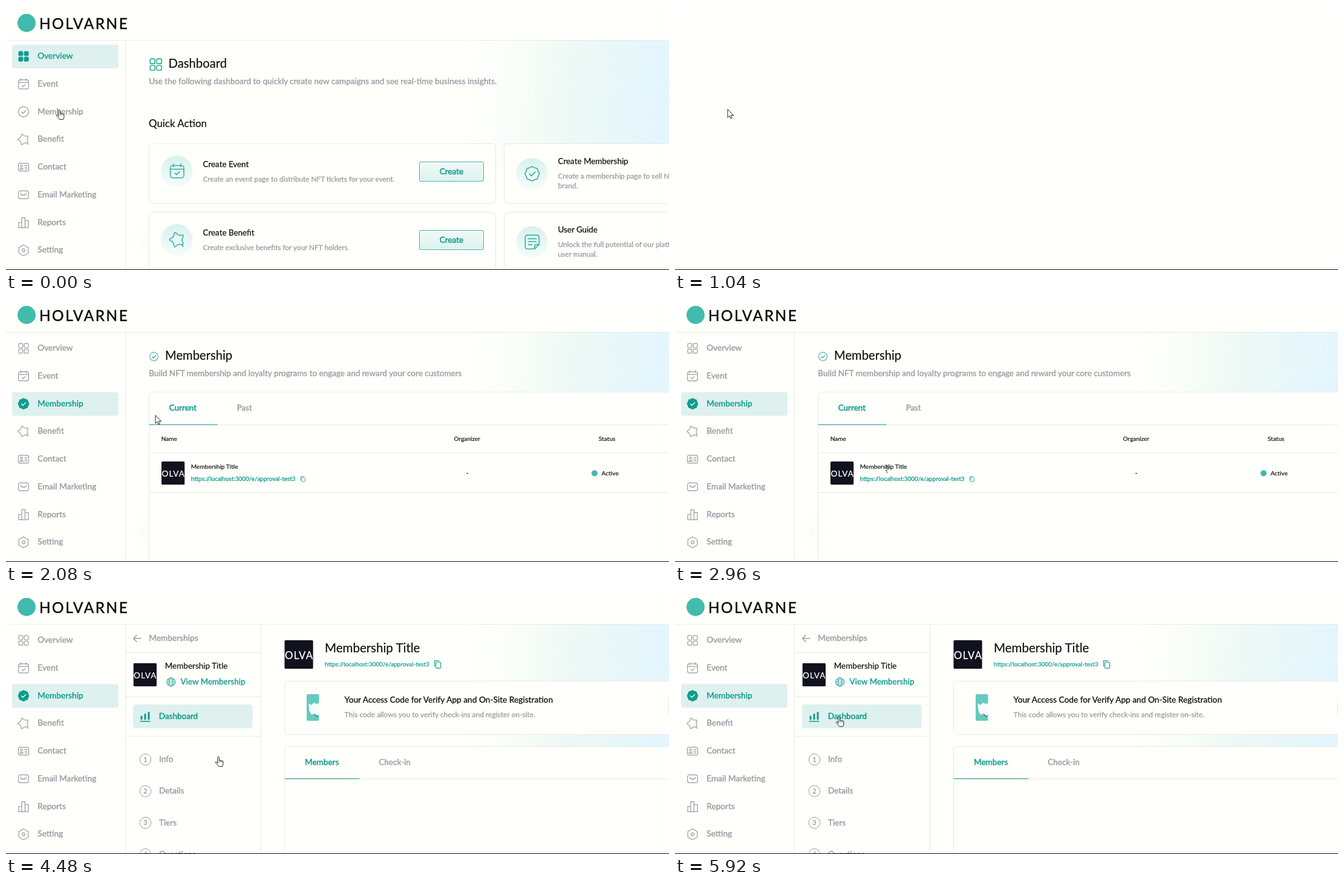
These frames come from a looping animation (1096 px wide and 436 px high, 6.08 s). An HTML page:

```html
<!DOCTYPE html>
<html lang="en">
<head>
<meta charset="utf-8">
<title>Dashboard walkthrough</title>
<style>
  html, body { margin: 0; width: 100%; height: 100%; overflow: hidden; background: #fffffc; }
  svg { display: block; width: 100%; height: 100%; font-family: Lato, "Open Sans", sans-serif; }
</style>
</head>
<body>
<svg id="stage" viewBox="0 0 1096 436"></svg>
<script>
const BG = '#fffffc', TEAL = '#109c8b', MINT = '#def1ef', GRAY = '#9b9ba2', INK = '#111', LINE = '#e8e8e8';
const BRAND = 'HOLVARNE';

// ---- drawing helpers ----
const text = (x, y, size, str, fill = INK, weight = 0.2, extra = '') =>
  `<text x="${x}" y="${y}" font-size="${size}" fill="${fill}" stroke="${fill}" stroke-width="${weight}" ${extra}>${str}</text>`;
const rect = (x, y, w, h, r, fill = BG, stroke = 'none', extra = '') =>
  `<rect x="${x}" y="${y}" width="${w}" height="${h}" rx="${r}" fill="${fill}" stroke="${stroke}" ${extra}/>`;
const path = (d, stroke, width = 1, fill = 'none') =>
  `<path d="${d}" fill="${fill}" stroke="${stroke}" stroke-width="${width}" stroke-linejoin="round" stroke-linecap="round"/>`;
const disc = (x, y, r, fill, stroke = 'none', width = 1) =>
  `<circle cx="${x}" cy="${y}" r="${r}" fill="${fill}" stroke="${stroke}" stroke-width="${width}"/>`;
const line = (d, color = LINE) => path(d, color);
const group = (body, attrs = '') => `<g ${attrs}>${body}</g>`;

// closed outline alternating between two radii, with rounded corners
function burst(n, outer, inner, turn = 0) {
  const corner = i => {
    const a = turn + i * Math.PI / n, r = i % 2 ? inner : outer;
    return [r * Math.sin(a), -r * Math.cos(a)];
  };
  const toward = (p, q) => p.map((v, k) => v + (q[k] - v) * 0.35);
  const str = p => p.map(v => v.toFixed(2)).join(' ');
  let d = '';
  for (let i = 0; i < n * 2; i++) {
    const p = corner(i);
    d += (i ? 'L' : 'M') + str(toward(p, corner(i + 2 * n - 1))) + 'Q' + str(p) + ' ' + str(toward(p, corner(i + 1)));
  }
  return d + 'Z';
}

// ---- icons, centred on 0,0 ----
const icons = {
  grid: (c, on) => [[-8, -8], [1.2, -8], [-8, 1.2], [1.2, 1.2]]
    .map(([x, y]) => rect(x, y, 6.8, 6.8, 1.6, on ? c : 'none', c, 'stroke-width="1.2"')).join(''),
  event: c => rect(-8.3, -7, 16.6, 15, 3, 'none', c, 'stroke-width="1.2"') +
    path('M-8-2.6H8M-4.5-9V-5.6M4.5-9V-5.6M-2.6 2.3L-.6 4.2 3 .7', c, 1.2),
  badge: (c, on) => path(burst(8, 9.2, 7.8), c, 1.2, on ? c : 'none') +
    path('M-3.4.3L-1 2.7 3.6-2', on ? '#fff' : c, 1.3),
  star: c => path(burst(5, 10.2, 5.6, -0.3), c, 1.2) + path('M5.4 6.2l2 2', c, 1.2),
  contact: c => rect(-8.5, -6.5, 17, 13, 2.5, 'none', c, 'stroke-width="1.2"') +
    disc(-3.3, -1.8, 1.8, 'none', c, 1.2) + path('M-6.3 3.5q3-3.4 6 0ZM2-2.5H6M2 .3H6M2 3H6', c, 1.2),
  mail: c => rect(-8.3, -6.5, 16.6, 13, 3, 'none', c, 'stroke-width="1.2"') + path('M-5-2.2Q0 3.6 5-2.2', c, 1.2),
  bars: c => path('M-8 8.4V0H-3V8.4M-3 8.4V-8H2.4V8.4M2.4 8.4V-3.4H8V8.4M-8.6 8.4H8.6', c, 1.2),
  setting: c => path('M0-9L7.8-4.5V4.5L0 9-7.8 4.5V-4.5Z', c, 1.2) + disc(0, 0, 2.5, 'none', c, 1.2),
  note: c => path('M-5.5-8.5H5.5Q8.5-8.5 8.5-5.5V3L3 8.5H-5.5Q-8.5 8.5-8.5 5.5V-5.5Q-8.5-8.5-5.5-8.5Z' +
    'M8.5 3H5.5Q3 3 3 5.5V8.5M-4.8-4H4.8M-4.8-.4H4.8M-4.8 3.2H0', c, 1.2),
  copy: c => rect(-2.2, -2.6, 5.6, 6.8, 1, BG, c, 'stroke-width=".8"') + path('M-3.6 2V-4.2H1.6', c, .8),
  globe: c => disc(0, 0, 7, 'none', c) + `<ellipse rx="3.2" ry="7" fill="none" stroke="${c}"/>` +
    path('M-7 0H7M-6-3.4H6M-6 3.4H6', c, .8)
};
const icon = (name, x, y, color, on = false, scale = 1) =>
  group(icons[name](color, on), `transform="translate(${x} ${y}) scale(${scale})"`);

function thumb(x, y, size) {
  return `<svg x="${x}" y="${y}" width="${size}" height="${size}" viewBox="0 0 38 38">` +
    rect(0, 0, 38, 38, 2, '#12121f') +
    text(19.5, 24.8, 13.4, BRAND.slice(1, 5), '#fff', .2, 'text-anchor="middle" letter-spacing="1"') + '</svg>';
}

// ---- shared parts ----
const menu = [['Overview', 'grid'], ['Event', 'event'], ['Membership', 'badge'], ['Benefit', 'star'],
  ['Contact', 'contact'], ['Email Marketing', 'mail'], ['Reports', 'bars'], ['Setting', 'setting']];

function frame(active) {
  const items = menu.map(([label, name], i) => {
    const y = 83.2 + 45.75 * i, on = i === active, c = on ? TEAL : GRAY;
    return (on ? rect(10, y - 19.3, 176, 39.2, 4, MINT) : '') +
      icon(name, 29, y, c, on) + text(52.3, y + 3.8, 13.7, label, c, .4);
  }).join('');
  return disc(34, 28, 15, '#41bbac') +
    text(55, 37.5, 24.4, BRAND, '#0c0c0c', .5, 'letter-spacing="2.5"') + items;
}

let streaks = '';
for (let i = 0; i < 9; i++) {
  const x = 905 + i * 27, y = 66 + (i * 37) % 60;
  streaks += `M${x} ${y + 34}l32-34`;
}
const glow = rect(740, 57, 356, 210, 0, 'url(#glow)') +
  `<path d="${streaks}" stroke="#fff" stroke-width="6" opacity=".13"/>` +
  rect(198, 340, 60, 95, 0, 'url(#haze)');
const edges = line('M0 56.5H1096M197.5 57V435');
const backdrop = glow + edges;

// ---- pages ----
function card(x, y, w, name, cy, title, lines, button) {
  const tx = x + 89, top = cy - (button ? 7 : 16);
  return rect(x, y, w, 99, 6, BG, LINE) + disc(x + 46, cy, 26, 'url(#puff)') +
    icon(name, x + 46.3, cy, '#35b3a3', false, 1.35) + text(tx, top, 13.4, title, INK, .25) +
    lines.map((s, i) => text(tx, top + 24.3 + 16 * i, 11.8, s, GRAY, .3)).join('') +
    (button ? rect(x + 447, cy - 15.5, 106, 32, 2.5, 'url(#btn)', '#4bb5a8') +
      text(x + 500, cy + 5, 13.6, 'Create', TEAL, .5, 'text-anchor="middle"') : '');
}

const overview = backdrop + frame(0) +
  icon('grid', 247.7, 96.7, TEAL, false, 1.18) + text(268.5, 102, 20.3, 'Dashboard') +
  text(236.3, 129.4, 13.5, 'Use the following dashboard to quickly create new campaigns and see real-time business insights.', GRAY, .35) +
  text(236, 200, 16.9, 'Quick Action') +
  card(236.5, 227.5, 573, 'event', 273, 'Create Event',
    ['Create an event page to distribute NFT tickets for your event.'], true) +
  card(823.5, 227.5, 573, 'badge', 277, 'Create Membership',
    ['Create a membership page to sell NFT memberships for your', 'brand.']) +
  card(236.5, 340.5, 573, 'star', 386, 'Create Benefit',
    ['Create exclusive benefits for your NFT holders.'], true) +
  card(823.5, 340.5, 573, 'note', 389.8, 'User Guide',
    ['Unlock the full potential of our platform with this', 'user manual.']);

const url = 'https://localhost:3000/e/approval-test3';

const list = group(rect(815, 60, 281, 95, 0, 'url(#block)'), 'id="rough"') +
  group(backdrop + rect(236.5, 155.5, 900, 300, 6, BG, LINE), 'id="late"') + frame(2) +
  icon('badge', 244.5, 96.7, TEAL, false, .83) + text(263, 102, 20.2, 'Membership') +
  text(236.3, 129.4, 13.5, 'Build NFT membership and loyalty programs to engage and reward your core customers', GRAY, .35) +
  text(269.7, 186.3, 13.5, 'Current', TEAL, .5) + text(381.8, 186.3, 13.2, 'Past', GRAY, .4) +
  line('M237 209.5H1096M237 255.8H1096M237 321.5H1096') +
  path('M237 209.2H349', '#3aaa9c', 1.2) +
  text(256.7, 235.6, 10.1, 'Name') + text(740.6, 235.6, 10.1, 'Organizer') + text(979.8, 235.6, 10.2, 'Status') +
  thumb(257, 270, 38.5) + text(305.8, 282.2, 10.15, 'Membership Title') +
  text(305.8, 301.5, 9.95, url, TEAL, .3) + icon('copy', 491, 299, TEAL) +
  text(760.4, 292.5, 10.5, '-') + disc(973, 289.5, 5, '#3fbaab') + text(984.6, 293, 10.1, 'Active');

const steps = ['Info', 'Details', 'Tiers', 'Questions'].map((label, i) => {
  const y = 280 + 52.2 * i;
  return disc(230.5, y, 9.3, 'none', GRAY) +
    text(230.5, y + 3.7, 11, i + 1, GRAY, .3, 'text-anchor="middle"') + text(253, y + 4.2, 13.6, label, GRAY, .4);
}).join('');

const phone = rect(497, 172, 20.5, 44, 2.5, '#66cabe') +
  path('M500 187l5 3 4-4 4 2 5-1 1 17-5 4-4-4-5 2-3-5Z', 'none', 0, '#f7fcfb') +
  path('M511 206l4 3', '#33514e', 1.2);

const detail = backdrop + frame(2) + rect(198, 57, 223, 378, 0) +
  line('M421.5 57V435M198 103.5H421M198 176.5H421M198 241.5H421') +
  path('M223 80H211M216 74.6L210.7 80 216 85.4', GRAY, 1.4) + text(236.3, 84, 13.7, 'Memberships', GRAY, .4) +
  thumb(210.5, 120.7, 38.5) + text(262.8, 130.2, 13.5, 'Membership Title') +
  icon('globe', 272.7, 152, TEAL) + text(288.6, 156.2, 13.45, 'View Membership', TEAL, .35) +
  rect(210, 189, 197.5, 39.5, 4, MINT) +
  path('M224 213V209M230 213V205.5M236 213V202.5', TEAL, 3) + path('M222 217H238', TEAL, 1.4) +
  text(252.8, 213, 13.5, 'Dashboard', TEAL, .5) + steps +
  thumb(460.3, 82.8, 47.5) + text(527, 102.8, 20.5, 'Membership Title') +
  text(527, 125.5, 9.95, url, TEAL, .25) + icon('copy', 713.7, 123, TEAL, false, 1.45) +
  rect(460.5, 150.5, 700, 88, 5, BG, LINE) + phone +
  text(559.6, 186.2, 13.72, 'Your Access Code for Verify App and On-Site Registration', INK, .3) +
  text(559.6, 210.2, 12, 'This code allows you to verify check-ins and register on-site.', GRAY, .3) +
  line('M1095.5 178V206') +
  rect(460.5, 258.5, 700, 200, 5, BG, LINE) +
  text(494, 288.6, 13.6, 'Members', TEAL, .5) + text(616.3, 288.6, 13.5, 'Check-in', GRAY, .4) +
  line('M461 312H1096') + path('M461 311.7H584', '#3aaa9c', 1.2);

// ---- pointers, hot spot at 0,0 ----
const pointers = {
  arrow: path('M0 0V13.2L3 10.4 5 15 7.2 14 5.2 9.6H9.3Z', '#222', 1, '#fff'),
  hand: group(path('M4.5 11V1.8a1.3 1.3 0 0 1 2.6 0V7a1.2 1.2 0 0 1 2.3.3 1.2 1.2 0 0 1 2.2.5 1.1 1.1 0 0 1 2 .6V12q0 2-1.5 4.6H6.2Q4 13 1 10.3q-.4-1.4 1.2-1.5Q3.5 9.3 4.5 11Z', '#222', 1, '#fff') +
    path('M7.1 7V9.5M9.4 7.5V9.7M11.6 8V10', '#444', .8), 'transform="translate(-4.6 -.2)"'),
  faint: path('M.3 1V9.5M2.8 0V9M-2.2 9.5q2-.6 2.4 2.2 1.6.8.4 2.4', '#333', .9)
};

const stops = (...list) => list.map(([o, c, a = 1]) => `<stop offset="${o}" stop-color="${c}" stop-opacity="${a}"/>`).join('');
const $ = id => document.getElementById(id);

$('stage').innerHTML = `<defs>
  <linearGradient id="glow" gradientUnits="userSpaceOnUse" x1="770" y1="120" x2="1090" y2="150">
    ${stops([0, BG], [.25, '#f8fdf9'], [.5, '#eef9f5'], [.78, '#e7f7fa'], [1, '#e4f5fd'])}</linearGradient>
  <radialGradient id="haze">${stops([0, '#fbfbfa'], [1, BG, 0])}</radialGradient>
  <linearGradient id="block">${stops([0, '#fbfefa', .3], [.15, '#f2faf6'], [.6, '#ecf8f6'], [1, '#e3f5fd'])}</linearGradient>
  <linearGradient id="puff" x2="0" y2="1">${stops([0, '#d9f1ee'], [1, '#f6fcfa'])}</linearGradient>
  <linearGradient id="btn" x2="0" y2="1">${stops([0, '#f2faf8'], [1, '#dcf1ee'])}</linearGradient>
  </defs>` + rect(0, 0, 1096, 436, 0) +
  group(overview, 'id="overview"') + group(list, 'id="list"') + group(detail, 'id="detail"') +
  rect(0, 435, 1096, 1, 0, '#111') +
  group(Object.entries(pointers).map(([k, v]) => group(v, `id="${k}"`)).join(''), 'id="pointer"');

// ---- timeline ----
const LOOP = 6080, TICK = 80;
const route = [[0, 87, 171], [1840, 87, 171], [2080, 247, 194], [2560, 350, 275],
  [4880, 350, 275], [5200, 270, 209], [LOOP, 270, 209]];

function place(t) {
  const i = Math.max(1, route.findIndex(k => k[0] > t));
  const [t0, x0, y0] = route[i - 1], [t1, x1, y1] = route[i];
  const p = (t - t0) / (t1 - t0);
  return [x0 + (x1 - x0) * p, y0 + (y1 - y0) * p];
}

const show = (id, on) => $(id).setAttribute('display', on ? 'inline' : 'none');

function draw(time) {
  const t = Math.floor(time % LOOP / TICK) * TICK;
  show('overview', t < 960);
  show('list', t >= 1360 && t < 4320);
  show('detail', t >= 4320);

  const settle = Math.min(1, Math.max(0, (t - 1360) / 320));
  $('late').setAttribute('opacity', settle);
  $('rough').setAttribute('opacity', 1 - settle);

  const [x, y] = place(t);
  let shape = 'hand';
  if (t >= 960 && t < 1360 || t >= 1840 && t < 4320 && x > 186 && y < 256) shape = 'arrow';
  else if (t >= 2960 && t < 4320) shape = 'faint';
  for (const k in pointers) show(k, k === shape);
  $('pointer').setAttribute('transform', `translate(${x} ${y})`);
}

const start = performance.now();
function tick() {
  draw(performance.now() - start);
  requestAnimationFrame(tick);
}
tick();
</script>
</body>
</html>
```
